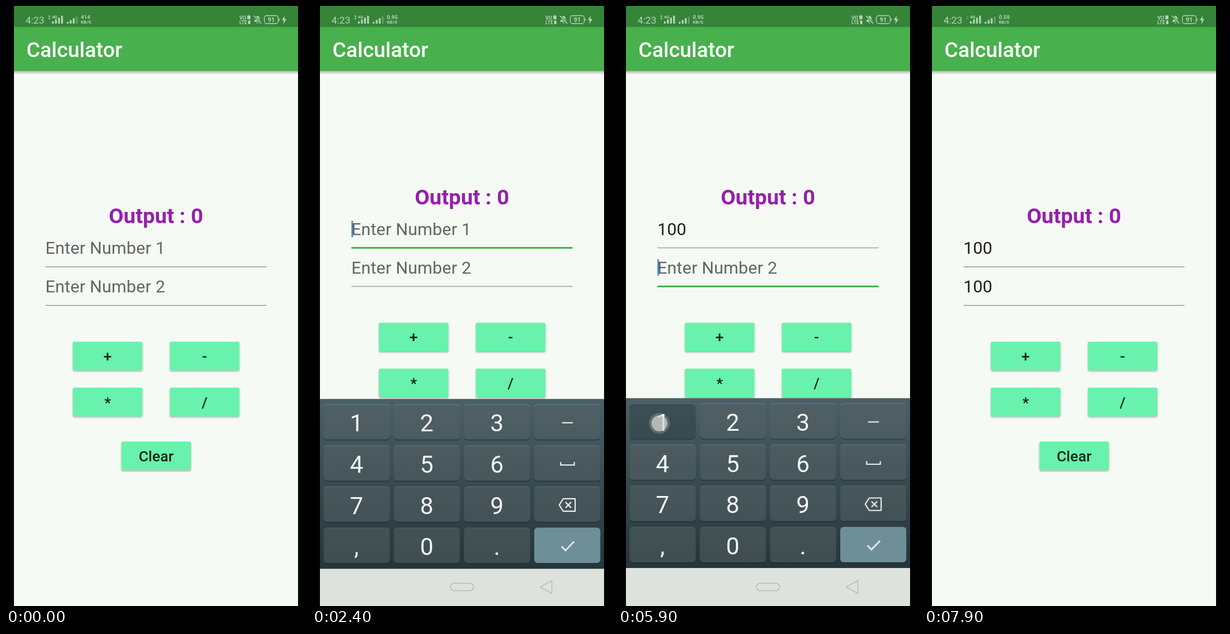
Animation of 529x1058 px, one loop 8000 ms. Source, as an HTML page:

```html
<!DOCTYPE html>
<html lang="en">
<head>
<meta charset="utf-8">
<title>Calculator</title>
<style>
  html, body { margin: 0; width: 100%; height: 100%; overflow: hidden; background: #000; }
  svg { display: block; width: 100vw; height: 100vh; }
  text { font-family: Roboto, sans-serif; }
  .field { font-size: 30px; letter-spacing: .2px; }
  .button { font-size: 26.3px; font-weight: 500; fill: #10261b; text-anchor: middle; }
  .digit { font-size: 42px; fill: #f3f6f6; text-anchor: middle; }
  .tiny { font-weight: 700; fill: #b5d5b7; }
  .icon { fill: none; stroke: #e6ecec; stroke-width: 2.2; }
</style>
</head>
<body>
<svg viewBox="0 0 529 1058">
  <defs>
    <linearGradient id="board" x1="0" y1="0" x2="0" y2="1">
      <stop offset="0" stop-color="#4b6067"/>
      <stop offset=".5" stop-color="#374a50"/>
      <stop offset="1" stop-color="#25363a"/>
    </linearGradient>
    <linearGradient id="barShadow" x1="0" y1="0" x2="0" y2="1">
      <stop offset="0" stop-color="#000" stop-opacity=".3"/>
      <stop offset="1" stop-color="#000" stop-opacity="0"/>
    </linearGradient>
    <filter id="raised" x="-10%" y="-10%" width="120%" height="135%">
      <feDropShadow dx="0" dy="1.8" stdDeviation="1.5" flood-opacity=".32"/>
    </filter>
  </defs>

  <rect width="529" height="1058" fill="#f6faf5"/>

  <g id="content">
    <text x="264.4" y="383" font-size="37.8" font-weight="700" fill="#9520ab" text-anchor="middle">Output : 0</text>
    <g id="fields"></g>
    <g id="buttons"></g>
  </g>

  <g id="nav">
    <rect x="14" y="991" width="501" height="67" fill="#dee2dd"/>
    <g fill="none" stroke="#b9bdb9" stroke-width="1.5">
      <rect x="244" y="1018" width="41" height="13" rx="6.5"/>
      <path d="M402.500 1024.500L423 1013V1036Z" stroke-linejoin="round"/>
    </g>
  </g>

  <g id="keyboard">
    <rect x="14" y="691.500" width="501" height="299.500" fill="url(#board)"/>
    <g id="keys"></g>
    <path class="icon" d="M441 733.500H460" stroke-width="2.6"/>
    <path class="icon" d="M438.500 802.500V808H462.500V802.500"/>
    <path class="icon" d="M443 867.500H464V889.500H443L436 878.500Z" stroke-linejoin="round"/>
    <path class="icon" d="M447 873.500L457 883.500M457 873.500L447 883.500"/>
    <path class="icon" d="M440 951.500L447 958.500L462 943" style="stroke-width:2.8"/>
  </g>

  <rect x="14" y="114" width="501" height="7" fill="url(#barShadow)"/>
  <rect x="14" width="501" height="37.500" fill="#358438"/>
  <rect x="14" y="37" width="501" height="77.500" fill="#48b04c"/>
  <text x="36" y="89.500" font-size="37" font-weight="500" fill="#fff">Calculator</text>

  <g fill="#b5d5b7">
    <text x="34.500" y="31" font-size="17.2">4:23</text>
    <path id="traffic" d="M74.500 19L76.500 16L78.500 19ZM74.500 21L76.500 24L78.500 21Z"/>
    <text class="tiny" x="81" y="22" font-size="7.500">4G</text>
    <g id="signal"></g>
    <text class="tiny" id="speed" x="132" y="22.500" font-size="9.500"></text>
    <text class="tiny" x="132" y="30.500" font-size="8">KB/S</text>
    <text class="tiny" x="411.500" y="23.500" font-size="9">VO</text>
    <text class="tiny" x="411.500" y="32" font-size="8.500">LTE</text>
    <rect x="425.500" y="16.500" width="5.500" height="7" rx="1"/>
    <rect x="427" y="25.500" width="4" height="6.500" rx="1"/>
    <path d="M438 28V26L440 24V21Q440 18 443 17.500Q447 18 447 22V24L449 26V28ZM441.500 29.500H445.500Q443.500 32 441.500 29.500Z"/>
    <path d="M437 17L450 31" stroke="#358438" stroke-width="4"/>
    <path d="M437 17L450 31" stroke="#b5d5b7" stroke-width="1.6"/>
    <rect x="455.500" y="17" width="24.500" height="14" rx="4" fill="none" stroke="#b5d5b7" stroke-width="1.3"/>
    <path d="M481.500 22V26" stroke="#b5d5b7" stroke-width="1.4"/>
    <text class="tiny" x="467.700" y="28.300" font-size="11" text-anchor="middle" font-weight="500">91</text>
    <path d="M491.500 17L486.500 25H489.700L488.700 32L494.500 23H491Z"/>
  </g>

  <g id="touch">
    <circle r="18.500" fill="#fff" opacity=".2"/>
    <circle r="14" fill="#d0d3d1" opacity=".85"/>
  </g>
  <path d="M0 0H14V1058H0ZM515 0H529V1058H515Z"/>
</svg>

<script>
const LOOP = 8000;
const STEP = 100;
const FOCUS = [2000, 5200, 7200];
const SLIDE_IN = [2150, 2450];
const SLIDE_OUT = [7050, 7250];

// Taps: start, end, x, y and the pressed key, if any.
const taps = [
  [1800, 1950, 190, 430],
  [2900, 3100, 75, 738, '1'],
  [3400, 3600, 207, 967, '0'],
  [3800, 4000, 205, 966, '0'],
  [5000, 5200, 190, 463],
  [5800, 6000, 73, 736, '1'],
  [6200, 6400, 207, 965, '0'],
  [6500, 6700, 206, 966, '0'],
  [6900, 7100, 468, 964, 'ok']
];
// When each digit of "100" appears, per field.
const typed = [[3100, 3600, 4000], [6000, 6400, 6700]];

const $ = id => document.getElementById(id);
const clamp = v => Math.max(0, Math.min(1, v));
const ramp = (t, [a, b]) => clamp((t - a) / (b - a));
const easeOut = p => 1 - (1 - p) ** 3;

function add(parent, tag, attrs, text = '') {
  const node = document.createElementNS('http://www.w3.org/2000/svg', tag);
  for (const name in attrs) node.setAttribute(name, attrs[name]);
  node.textContent = text;
  parent.append(node);
  return node;
}

function set(node, attrs) {
  for (const name in attrs) node.setAttribute(name, attrs[name]);
}

const fields = [0, 1].map(i => {
  const y = 437 + 68 * i;
  return {
    caret: add($('fields'), 'rect', { y: y - 15.5 - 17, width: 2.8, height: 35, fill: '#4285e8' }),
    text: add($('fields'), 'text', { class: 'field', x: 69.5, y }),
    line: add($('fields'), 'rect', { x: 69.5, width: 390 }),
    lineY: y + 23
  };
});

[['+', 118, 592], ['-', 289, 592], ['*', 118, 673], ['/', 289, 673], ['Clear', 203.5, 768]]
  .forEach(([label, x, y]) => {
    add($('buttons'), 'rect', { x, y, width: 122.5, height: 50.5, rx: 2.8, fill: '#67f2ad', filter: 'url(#raised)' });
    add($('buttons'), 'text', { class: 'button', x: x + 61.2, y: y + 34.7 }, label);
  });

const keys = {};
[['1', '2', '3', 'minus'], ['4', '5', '6', 'space'], ['7', '8', '9', 'erase'], [',', '0', '.', 'ok']]
  .forEach((row, r) => row.forEach((name, c) => {
    const x = 20.5 + 123.8 * c, y = 700.3 + 72.7 * r;
    add($('keys'), 'rect', { x, y: y + 1.5, width: 116.5, height: 63, rx: 6, fill: '#16262a', opacity: .45 });
    keys[name] = add($('keys'), 'rect', { x, y, width: 116.5, height: 62.5, rx: 6 });
    if (name.length === 1) add($('keys'), 'text', { class: 'digit', x: x + 58, y: y + 48.7 }, name);
  }));

// Two antennas; the last bar of the second one is dim.
[81, 107].forEach((x, antenna) => {
  for (let i = 0; i < 4; i++) {
    const height = antenna ? 3 + 3.2 * i : 4 + 3.3 * i;
    add($('signal'), 'rect', {
      x: x + 5.4 * i, y: 31 - height, width: 3.2, height, opacity: antenna && i === 3 ? .35 : 1
    });
  }
});

function drawFields(t) {
  const focused = t < FOCUS[0] || t >= FOCUS[2] ? -1 : t < FOCUS[1] ? 0 : 1;
  fields.forEach((field, i) => {
    const count = typed[i].filter(time => t >= time).length;
    const active = i === focused;
    field.text.textContent = '100'.slice(0, count) || `Enter Number ${i + 1}`;
    set(field.text, { fill: count ? '#1c1f1c' : '#626562' });
    set(field.line, active
      ? { y: field.lineY - 1.5, height: 3, fill: '#43b348' }
      : { y: field.lineY - .9, height: 1.7, fill: '#a5a9a5' });
    const last = Math.max(FOCUS[i], ...typed[i].filter(time => t >= time));
    // A caret already shown for one blink restarts while a key is held.
    const held = i === 0 && taps.some(([a, b, , , key]) => key && t >= a && t < b);
    const lit = active && t < SLIDE_OUT[0] - 50 && (held || (t - last) % 1000 < 500 || (i === 1 && !count && t >= 5800));
    set(field.caret, { x: 69.5 + count * 17.05 - (count ? .2 : 0), opacity: lit ? 1 : 0, height: count ? 35 : 29,
      y: 426.5 + 68 * i - (count ? 17.5 : 14.5) });
  });
}

function drawKeyboard(t) {
  const shown = easeOut(ramp(t, SLIDE_IN)) * (1 - ramp(t, SLIDE_OUT) ** 2);
  const visible = shown > 0;
  set($('keyboard'), { transform: `translate(0 ${300 * (1 - shown)})`, opacity: visible ? clamp(shown * 2) : 0 });
  set($('nav'), { opacity: ramp(t, [2050, 2400]) * (1 - ramp(t, [7100, 7250])) });
  for (const name in keys) {
    const pressed = taps.some(([a, b, , , key]) => key === name && t >= a && t < b);
    set(keys[name], name === 'ok'
      ? { fill: '#6f8f98' }
      : { fill: '#fff', opacity: pressed ? .05 : .145 });
  }
}

function drawTouch(t) {
  const tap = taps.find(([a, b]) => t >= a && t < b + 100);
  if (!tap) return set($('touch'), { opacity: 0 });
  const [, end, x, y, key] = tap;
  set($('touch'), { transform: `translate(${x} ${y})`, opacity: t >= end ? .3 : key === 'ok' ? .5 : .9 });
}

function draw(t) {
  const lifted = t >= FOCUS[0] && t < FOCUS[2];
  set($('content'), { transform: `translate(0 ${lifted ? -33.5 : 0})` });
  const busy = t < 2800 || (t >= 5500 && t < 6500);
  set($('traffic'), { opacity: busy ? 1 : .35 });
  $('speed').textContent = t < 1900 ? '414' : t < 6500 ? '0.95' : '0.59';
  drawFields(t);
  drawKeyboard(t);
  drawTouch(t);
}

const start = performance.now();
function tick() {
  const t = (performance.now() - start) % LOOP;
  draw(Math.floor(t / STEP) * STEP);
  requestAnimationFrame(tick);
}
tick();
</script>
</body>
</html>
```
